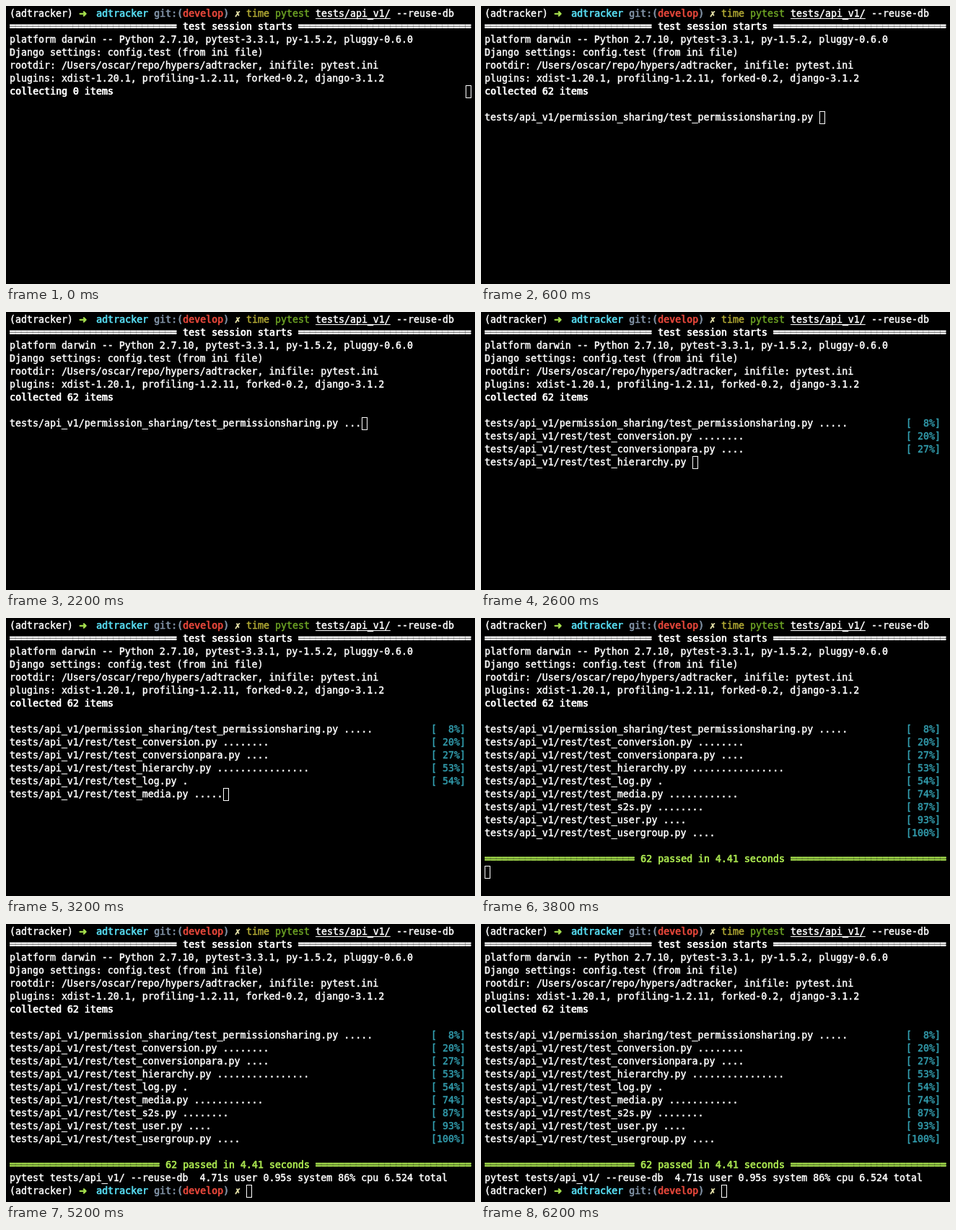
Animation, 650 px wide and 386 px high, one loop 6600 ms. Source, as an HTML page:

```html
<!DOCTYPE html>
<html lang="en">
<head>
<meta charset="utf-8">
<title>Test run</title>
<style>
html, body { margin: 0; width: 100%; height: 100%; overflow: hidden; background: #000; }
#term { position: absolute; left: 5px; top: 2px; width: 645px; height: 384px;
  font: 13.288px/17px "DejaVu Sans Mono", monospace; color: #fff;
  -webkit-text-stroke: .45px currentColor; }
#term span { position: absolute; white-space: pre; }
.b { text-shadow: .5px 0 currentColor; }
.rule { -webkit-text-stroke-width: 1px; }
.arrow, .pass { color: #a6e04e; }
.arrow { font-family: "DejaVu Sans", sans-serif; }
.dir { color: #55d6ea; }
.git { color: #7f90a3; }
.branch { color: #e2463a; }
.dirty { color: #efebb0; }
.time { color: #b3ab34; }
.cmd { color: #6da324; }
.arg { text-decoration: underline 1px; text-underline-offset: 2px; text-decoration-skip-ink: none; }
.pct { color: #329cad; }
.cursor { box-sizing: border-box; width: 8px; height: 18px; border: 1px solid #fff; }
</style>
</head>
<body>
<div id="term"></div>
<script>
const LOOP = 6600, CELL = 8, LINE = 18, COLS = 80;
const DONE_AT = 3800, EXIT_AT = 4200;

// [time, tests finished]; -1 while still collecting
const STEPS = [
  [0, -1], [600, 0], [2200, 3], [2400, 10], [2600, 17], [2800, 24],
  [3000, 31], [3200, 39], [3400, 47], [3600, 52], [DONE_AT, 62]
];

const FILES = [
  ["permission_sharing/test_permissionsharing", 5],
  ["rest/test_conversion", 8],
  ["rest/test_conversionpara", 4],
  ["rest/test_hierarchy", 16],
  ["rest/test_log", 1],
  ["rest/test_media", 12],
  ["rest/test_s2s", 8],
  ["rest/test_user", 4],
  ["rest/test_usergroup", 4]
];
const TOTAL = FILES.reduce((sum, [, n]) => sum + n, 0);

const term = document.getElementById("term");

function put(row, col, text, cls = "") {
  const el = document.createElement("span");
  el.className = cls;
  el.textContent = text;
  el.style.left = col * CELL + "px";
  el.style.top = row * LINE + "px";
  term.append(el);
}

const cursor = (row, col) => put(row, col, "", "cursor");

function prompt(row) {
  put(row, 0, "(adtracker)");
  put(row, 12, "➜", "b arrow");
  put(row, 15, "adtracker", "b dir");
  put(row, 25, "git:(", "b git");
  put(row, 30, "develop", "b branch");
  put(row, 37, ")", "b git");
  put(row, 39, "✗", "dirty");
}

function rule(row, title, cls) {
  const space = COLS - title.length - 2;
  const left = Math.floor(space / 2);
  const start = left + title.length + 2;
  put(row, 0, "=".repeat(left), cls + " rule");
  put(row, left + 1, title, cls);
  put(row, start, "=".repeat(COLS - start), cls + " rule");
}

function header() {
  prompt(0);
  put(0, 41, "time", "time");
  put(0, 46, "pytest", "cmd");
  put(0, 53, "tests/api_v1/", "arg");
  put(0, 67, "--reuse-db");
  rule(1, "test session starts", "b");
  put(2, 0, "platform darwin -- Python 2.7.10, pytest-3.3.1, py-1.5.2, pluggy-0.6.0");
  put(3, 0, "Django settings: config.test (from ini file)");
  put(4, 0, "rootdir: /Users/oscar/repo/hypers/adtracker, inifile: pytest.ini");
  put(5, 0, "plugins: xdist-1.20.1, profiling-1.2.11, forked-0.2, django-3.1.2");
}

function results(done) {
  let before = 0;
  for (const [i, [name, count]] of FILES.entries()) {
    const row = 8 + i;
    const dots = Math.min(count, done - before);
    const line = `tests/api_v1/${name}.py ` + ".".repeat(dots);
    put(row, 0, line);
    before += count;
    if (done < before) return cursor(row, line.length);
    const pct = Math.floor(100 * before / TOTAL);
    put(row, 73, `[${String(pct).padStart(3)}%]`, "pct");
  }
}

function draw(done, exited) {
  term.replaceChildren();
  header();
  if (done < 0) {
    put(6, 0, "collecting 0 items", "b");
    return cursor(6, COLS - 1);
  }
  put(6, 0, `collected ${TOTAL} items`, "b");
  results(done);
  if (done < TOTAL) return;
  rule(18, `${TOTAL} passed in 4.41 seconds`, "b pass");
  if (!exited) return cursor(19, 0);
  put(19, 0, "pytest tests/api_v1/ --reuse-db  4.71s user 0.95s system 86% cpu 6.524 total");
  prompt(20);
  cursor(20, 41);
}

let shown = "";
function tick() {
  const t = performance.now() % LOOP;
  const done = STEPS.findLast(([at]) => at <= t)[1];
  const exited = t >= EXIT_AT;
  const key = done + "/" + exited;
  if (key !== shown) {
    shown = key;
    draw(done, exited);
  }
  requestAnimationFrame(tick);
}
tick();
</script>
</body>
</html>
```
